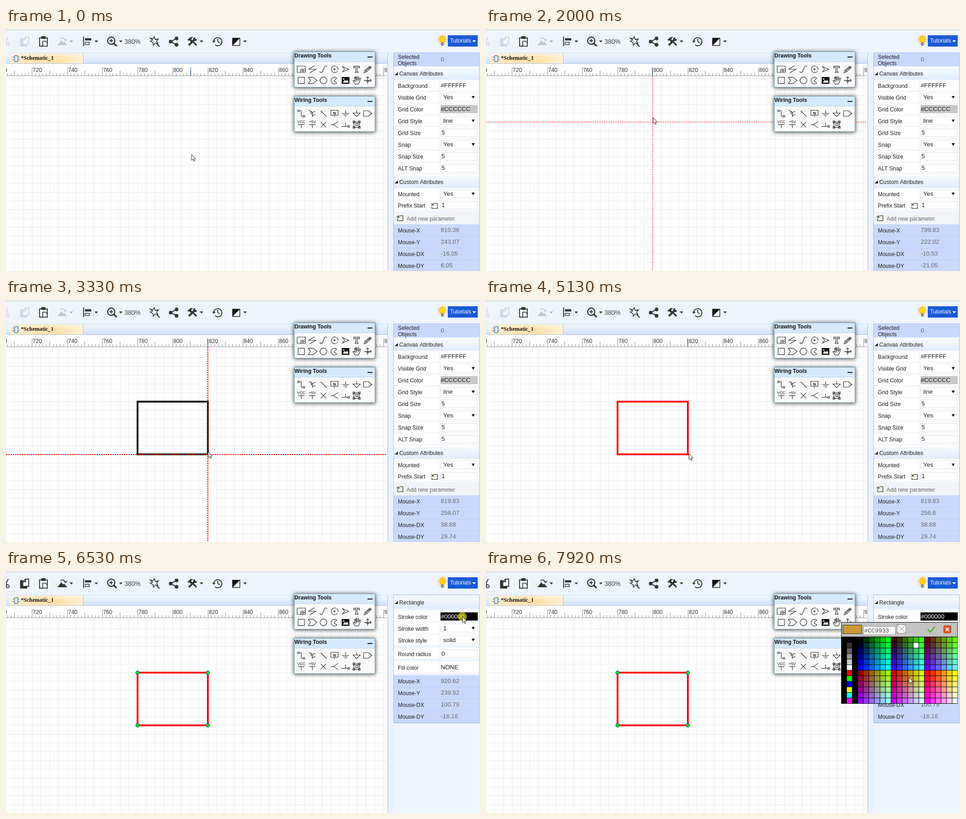
These frames come from a looping animation (1045x536 px, 8000 ms). An HTML page with a canvas:

```html
<!DOCTYPE html>
<html lang="en">
<head>
<meta charset="utf-8">
<title>Schematic editor</title>
<style>
html,body{margin:0;width:100%;height:100%;overflow:hidden;background:#f0f5ff}
canvas{display:block}
</style>
</head>
<body>
<canvas id="stage" width="1045" height="536"></canvas>
<script>
const c = document.getElementById('stage').getContext('2d');
const SANS = '"Liberation Sans",Arial,sans-serif';
const SERIF = '"Liberation Serif",Times,serif';
const MONO = '"Liberation Mono",monospace';
const LOOP = 8000, CELL = 19.375, OX = 290, OY = 226.4;
const BAR = '#eff5fe', INK = '#333', BLUE = '#c9d9fd', EDGE = '#9dbdea';

// ---- helpers ----
function path(d, stroke, fill, w = 1) {
  const p = new Path2D(d);
  if (fill) { c.fillStyle = fill; c.fill(p); }
  if (stroke) { c.strokeStyle = stroke; c.lineWidth = w; c.stroke(p); }
}
function box(x, y, w, h, fill, stroke) {
  if (fill) { c.fillStyle = fill; c.fillRect(x, y, w, h); }
  if (stroke) {
    c.strokeStyle = stroke; c.lineWidth = 1;
    c.strokeRect(x + .5, y + .5, w - 1, h - 1);
  }
}
function text(s, x, y, size = 12.24, color = '#1c1c1c', family = SANS, weight = '') {
  c.font = `${weight} ${size}px ${family}`;
  c.fillStyle = color;
  c.fillText(s, x, y);
}
function disc(x, y, r, fill, stroke, w = 1) {
  c.beginPath(); c.arc(x, y, r, 0, 7);
  if (fill) { c.fillStyle = fill; c.fill(); }
  if (stroke) { c.strokeStyle = stroke; c.lineWidth = w; c.stroke(); }
}
function fade(x, y, w, h, stops, across) {
  const g = across ? c.createLinearGradient(x, 0, x + w, 0) : c.createLinearGradient(0, y, 0, y + h);
  stops.forEach((s, i) => g.addColorStop(i / (stops.length - 1), s));
  box(x, y, w, h, g);
}
const caret = (x, y, color = INK) => path(`M${x} ${y}h8l-4 4.5z`, null, color);

// ---- motion: start, end, step count, then [progress, x, y] ----
const moves = [
  [440, 1230, 11, [0,408.6,279],[.2,430,262],[.5,540,200],[.8,628,150],[.9,645.4,133.5],[1,648.5,109.5]],
  [1540, 2230, 10, [0,648.5,109.5],[.3,560,140],[.8,320,212],[1,295.4,221.9]],
  [2610, 3330, 10, [0,295.4,221.9],[.1,318,231],[.3,399.4,279],[.6,430,312],[1,445.3,337.1]],
  [4720, 4960, 4, [0,445.3,337.1],[1,446,338.5]],
  [5130, 5200, 2, [0,446,338.5],[.5,447,341],[1,447,341]],
  [5840, 6530, 10, [0,447,341],[.2,520,335],[.5,740,300],[.7,835.9,266.8],[.85,950,170],[1,1006,103]],
  [6690, 7450, 11, [0,1006,103],[.3,1003,112],[.7,985,150],[1,958,163]],
  [7530, 7920, 6, [0,958,163],[.3,948,168],[1,932,237]]
];
const clicks = [[290,440],[1310,1540],[2460,2610],[4260,4720],[5200,5430],[6530,6690]];

function pointer(t) {
  let at = [408.6, 279];
  for (const [t0, t1, n, ...pts] of moves) {
    if (t < t0) break;
    const step = Math.floor((t - t0) / (t1 - t0) * (n - 1) + 1e-6) + 1;
    const u = Math.min(1, step / n);
    const i = Math.max(1, pts.findIndex(p => p[0] >= u - 1e-9));
    const [a, b] = [pts[i - 1], pts[i]], k = (u - a[0]) / (b[0] - a[0]);
    at = [a[1] + (b[1] - a[1]) * k, a[2] + (b[2] - a[2]) * k];
  }
  return at;
}
const onSheet = ([x, y]) => x < 840 && y > 106 && !(x > 634 && x < 815 && y < 230);
const round2 = v => +v.toFixed(2);

function readout(t, p) {
  if (t < 440) return [810.36, 243.07, -16.05, 6.05];
  let X, Y;
  if (t >= 3330 && t < 5840) [X, Y] = [819.83, t < 5130 ? 258.07 : 258.6];
  else if (!onSheet(p)) [X, Y] = t < 2300 ? [871.68, 205.44] : [920.62, 239.92];
  else {
    X = round2(810.36 + Math.round((p[0] - 408.6) / 1.0197) / 3.8);
    Y = round2(243.07 + Math.round((p[1] - 279) / 1.0197) / 3.8);
  }
  const [bx, by] = t < 2610 ? [810.36, 243.07] : t < 5430 ? [781.15, 228.33] : [819.83, 258.08];
  const dy = t >= 5130 && t < 5430 ? 29.74 : Y - by;
  return [X, Y, round2(X - bx), round2(dy)];
}

// ---- top bar ----
function toolbar(selected) {
  box(0, 0, 1045, 536, BAR);
  box(0, 0, 1045, 4, '#f1f1f1');
  box(0, 4, 1045, 1, '#c9c9c9');
  const soft = selected ? INK : '#d3d6dc';
  path('M5 20L-4 37M-6 20L2 33', soft, null, 2);
  disc(4, 36, 3.3, null, soft, 1.8);
  path('M31 24q0-2 2-2h4v15h10v4h-14q-2 0-2-2z', null, soft);
  path('M37 26l6-6h7v16h-13zM37 26h6v-6', soft, BAR, 2);
  path('M74 22h17v18h-17z', INK, BAR, 2);
  path('M78 18h9v6h-9z', null, INK);
  path('M81 29h6l4 4v7h-10z', INK, BAR, 1.6);
  const dim = selected ? INK : '#c3c6cc';
  path('M113.500 38L122 27L126 32L128 30L135 38z', null, dim);
  path('M120 23q8-3 11 4M128 25l3.500 3 2.500-4', dim, null, 1.6);
  caret(140, 27.5, selected ? INK : '#a5a8ae');
  path('M171 19v21', INK, null, 2);
  path('M174 22.5h14v5h-14z', null, INK);
  path('M174.5 31.5h9v5h-9z', INK, null, 1.4);
  caret(195, 27.5);
  disc(232, 28, 8, null, INK, 2.4);
  path('M228 28h8M232 24v8', INK, null, 2);
  path('M238 34l6 6', INK, null, 3.4);
  caret(249, 27.5);
  text('380%', 261, 35, 14, '#444');
  path('M318 22l6 2 3-5 2 6 7-1-4 5 3 5-6-1-4 5-1-6-6-3 5-2z', INK, null, 1.6);
  path('M332 34l6.500 7', INK, null, 2.4);
  path('M376 23L363 30L376 37', INK, null, 2);
  for (const [x, y] of [[376, 23], [363, 30], [376, 37]]) disc(x, y, 4, INK);
  path('M403 38L414 27', INK, null, 4);
  path('M410 28L420 38', INK, null, 3.6);
  path('M400 26l7-6h6l-5 4 3 4-3 3-4-4-2 1z', null, INK);
  path('M413 22l4-2v4l4 1-1 3-5 1-3-3z', null, INK);
  caret(427, 27.5);
  path('M458 30a9 9 0 1 1 3 7M467 24v6l4 3', INK, null, 1.9);
  path('M454.5 28h7.5l-4 5z', null, INK);
  path('M499.500 22.500h16v16h-16z', '#111', '#fff', 1.4);
  path('M499 22h17L499 39z', null, '#111');
  caret(523, 27.5);
  for (let i = 0; i < 12; i++) {
    const a = i * Math.PI / 6, x = Math.cos(a), y = Math.sin(a);
    path(`M${962 + 8 * x} ${26 + 8 * y}L${962 + 12 * x} ${26 + 12 * y}`, '#f0b73a', null, 1.4);
  }
  disc(962, 25, 7, '#fcd21c', '#e9a820');
  path('M959 31h6v8h-6z', null, '#8b8d92');
  box(974, 16, 66, 25, '#1a5ad7');
  text('Tutorials', 979, 32, 12.24, '#fff');
  caret(1028, 27, '#fff');
}

// ---- tab strip, ruler and sheet ----
function sheet(X, p) {
  fade(0, 55, 841, 23, ['#f3f8ff', '#e3eefc', '#cfe1f9']);
  box(0, 55, 841, 1, '#cfdff4');
  fade(8, 56, 162, 22, ['#fdecd2', '#ffe4b2', '#ffe1a8', '#fff0d6'], true);
  fade(8, 56, 162, 22, ['rgba(255,255,255,.45)', 'rgba(255,255,255,0)', 'rgba(255,255,255,0)']);
  box(170, 55, 1, 23, EDGE);
  box(0, 78, 841, 1, '#a9c4e8');
  path('M19 61h7v13h-7zM15 64h4M15 70h4M26 64h3M26 70h3', '#4b7fb8', '#e2eefa', 1.3);
  text('*Schematic_1', 33, 70, 12.24, '#111', SERIF, 'bold');

  box(0, 79, 841, 457, '#fefefe');
  c.save();
  c.beginPath(); c.rect(0, 79, 840, 457); c.clip();
  for (let x = OX % CELL; x < 840; x += CELL) box(Math.floor(x), 106, 1, 430, '#ececec');
  for (let y = OY - 6 * CELL; y < 536; y += CELL) if (y > 106) box(0, Math.floor(y), 840, 1, '#ececec');
  for (let v = 700; v <= 922; v += 2) {
    const x = Math.floor(OX + (v - 780) * 3.875);
    const top = v % 20 === 0 ? 87 : v % 10 === 0 ? 94 : 100;
    box(x, top, 1, 105 - top, '#8a8a8a');
    if (v % 20 === 0) text(v, x + 2, 97, 12.24, '#333');
  }
  box(0, 105, 840, 1, '#999');
  if (onSheet(p)) box(Math.round(289.4 + (X - 780) * 3.875), 87, 1, 18, '#1f6db8');
  c.restore();
  box(841, 55, 1, 481, EDGE);
  box(842, 55, 11, 481, '#e9f1fe');
}

function drawing(t, p) {
  const snap = (v, o) => o + Math.round((v - o) / CELL) * CELL;
  const sx = snap(p[0], OX), sy = snap(p[1], OY);
  if (t >= 2610) {
    const done = t >= 3330;
    const w = done ? 155 : sx - OX, h = done ? 116.25 : sy - OY;
    c.strokeStyle = t >= 5130 ? '#f00' : '#000';
    c.lineWidth = 3.875;
    c.strokeRect(OX, OY, w, h);
  }
  if (t >= 1540 && t < 4720 && onSheet(p)) {
    const bold = t >= 3330;
    c.save();
    c.setLineDash([3, 2]);
    path(`M0 ${Math.floor(sy) + (bold ? 1 : .5)}H840M${Math.floor(sx) + (bold ? 0 : .5)} 106V536`, '#f00', null, bold ? 2 : 1);
    c.restore();
  }
  if (t >= 5430) for (const x of [OX, OX + 155]) for (const y of [OY, OY + 116.25])
    disc(x, y, 4, '#00e800', '#2a35c8', 1.1);
}

// ---- floating palettes; icons sit around their own centre ----
const HAND = 'M-3 8L-8 1q0-2 2-1l3 2-2-8q1-2 2 0l2 5-1-7q1-2 2 0l1 7 2-7q2-1 2 1l-1 7 3-5q2-1 2 1l-3 8-2 4z';
const drawTools = [
  'M-9-7H9V7H-9zM-1 0H9M-1 0V7M-1 3.500H9M4 0V7', 'M5-8L-8 0H8L-6 8', 'M-8 4C-7 9-3 8-1 3L2-4C3-9 7-8 8-5',
  'M3-7A7.500 7.500 0 1 0 7 4M-3 0H3M0-3V3M4-6A7 7 0 0 1 8 1', 'M-7-6L7 0L-7 6L-2 0z',
  'M-6.500-7h13v4h-1.500l-1-2h-2.500v10l2 1v1h-7v-1l2-1v-10h-2.500l-1 2h-1.500z',
  'M-8 8l2-6L5-7l3 3L-3 6zM-6 2l3 4M2-5l3 3M-4 3L6-5',
  'M-7-7H7V7H-7z', 'M-9-7H2L10 0L2 7H-9L-4 0z', 'M-7.500 0a7.500 7.500 0 1 0 15 0a7.500 7.500 0 1 0-15 0z',
  'M5-5A7.500 7.500 0 1 0 5 6L-1 1z', 'M-8-7H8V7H-8z', HAND,
  'M-8 0H8M0-8V8M-3-5L0-8L3-5M5-3L8 0L5 3M-3 0a3 3 0 1 0 6 0'
];
const wireTools = [
  'M-4-6H0V6H4M-8-6a2 2 0 1 0 4 0a2 2 0 1 0-4 0M4 6a2 2 0 1 0 4 0a2 2 0 1 0-4 0',
  'M-8-6H-4L0-2V7M-3-5V-1L0 2M0-1L3-4H7M0 6L3 3H7', 'M-6-6L7 7', 'M-8-7H8V4H-8zM0 4V8',
  'M0-7V0M-8 0H8M-5 3H5M-2 6H2', 'M0-7V-1M-8-1H8L0 7z', 'M-9-6H2L9 0L2 6H-9z',
  'M-7 0H7M0 0V8', 'M-7 0H7M0 0V8', 'M-6-6L6 6M6-6L-6 6', 'M8-7L-2 0L8 7M-2 0H-8',
  'M-9 4H5M5 4a2 2 0 1 0 4 0a2 2 0 1 0-4 0', 'M-6-6H6V6H-6zM-8-8h4v4h-4zM4-8h4v4h-4zM-8 4h4v4h-4zM4 4h4v4h-4zM-2-3h5v5h-5z'
];
const wireLabels = { 3: ['N', 2], 7: ['VCC', -3], 8: ['+5V', -3], 11: ['1', 2] };
function palette(title, y, icons, first) {
  c.save();
  c.shadowColor = 'rgba(0,0,0,.75)'; c.shadowBlur = 9; c.shadowOffsetY = 1;
  box(635, y, 179, 79, '#fafafa');
  c.restore();
  box(635, y, 179, 22, '#d5e9fd');
  box(635, y + 22, 179, 1, '#bcd6ee');
  box(635, y, 179, 79, null, '#6f9cae');
  text(title, 636, y + 12.500, 12, '#111', SANS, 'bold');
  box(797, y + 11, 11, 2, '#111');
  icons.forEach((d, i) => {
    c.save();
    c.translate(651 + (i % 7) * 24.4, first + (i > 6 ? 24.600 : 0));
    path(d, '#2a2a2a', null, 1.15);
    if (icons === drawTools && i === 11) {
      path(d, null, '#111');
      path('M-6 5l4-6 3 3 2-4 4 7z', null, '#fff');
      disc(-4, -3, 1.5, '#fff');
    }
    if (icons === wireTools && wireLabels[i]) {
      const [s, b] = wireLabels[i];
      c.textAlign = 'center';
      text(s, 0, b, 8.500, '#111', SANS, s === 'N' ? 'bold' : '');
    }
    c.restore();
  });
}

// ---- attribute panel ----
function header(s, y) {
  fade(855, y, 188, 27, ['#f6faff', '#edf4ff', '#dfeafd']);
  path(`M864 ${y + 10}v7h-7z`, null, '#222');
  text(s, 867, y + 17.500);
}
function row(s, y, value, kind) {
  box(855, y - 18, 188, 26, '#fff');
  box(855, y + 7, 188, 1, '#dfe9f8');
  box(956, y - 18, 1, 26, '#e6edf8');
  text(s, 864, y);
  if (kind === 'select') {
    box(958, y - 15, 82, 19, '#fff', '#e6e6e6');
    text(value, 964, y - 1, 13.4);
    path(`M1026.500 ${y - 8}h7l-3.500 6z`, null, '#111');
  } else {
    if (kind) box(958, y - 14, 82, 18, kind === 'input' ? '#fff' : kind, kind === 'input' ? '#dedede' : null);
    text(value, kind === 'input' ? 960 : 958.5, y - 1, 13.4, kind === '#000' ? '#fff' : '#1c1c1c');
  }
}
function plusBox(x, y, mark) {
  path(`M${x + 6} ${y + 1}h8v11h-12v-4`, '#3f6a2c', null, 1.6);
  path(mark === 'x' ? `M${x + 1} ${y + 1}l5 5m0-5l-5 5` : `M${x} ${y + 3.500}h7m-3.500-3.500v7`, '#2b511c', null, 1.6);
}
function mouseRows(y, values) {
  box(855, y - 18, 188, 106, BLUE);
  ['Mouse-X', 'Mouse-Y', 'Mouse-DX', 'Mouse-DY'].forEach((s, i) => {
    const b = y + i * 26;
    box(855, b + 8, 188, 1, '#bccef5');
    text(s, 864, b);
    text(values[i], 958.5, b - 1, 13.4, '#666');
  });
}
function panel(selected, values) {
  box(854, 54, 190, 482, selected ? BAR : '#fff');
  if (selected) {
    header('Rectangle', 58);
    row('Stroke color', 107.5, '#000000', '#000');
    row('Stroke width', 133.5, '1', 'select');
    row('Stroke style', 159.5, 'solid', 'select');
    row('Round radius', 189.5, '0', 'input');
    row('Fill color', 219.5, 'NONE');
    mouseRows(250, values);
    box(854, 54, 190, 284, null, EDGE);
    return;
  }
  box(855, 55, 188, 30, BLUE);
  text('Selected', 864, 68);
  text('Objects', 864, 82);
  text('0', 958.5, 73.5, 13.4, '#666');
  header('Canvas Attributes', 87);
  row('Background', 132, '#FFFFFF');
  row('Visible Grid', 158, 'Yes', 'select');
  row('Grid Color', 184, '#CCCCCC', '#c8c8c8');
  row('Grid Style', 210, 'line', 'select');
  row('Grid Size', 236, '5', 'input');
  row('Snap', 262, 'Yes', 'select');
  row('Snap Size', 288, '5', 'input');
  row('ALT Snap', 314, '5', 'input');
  header('Custom Attributes', 326);
  row('Mounted', 371, 'Yes', 'select');
  row('Prefix Start', 396, '1', 'input');
  plusBox(937, 386, 'x');
  box(855, 405, 188, 28, '#f2f4f8');
  plusBox(861, 413, '+');
  text('Add new parameter', 883, 424.5, 12.24, '#666');
  mouseRows(451, values);
  box(854, 54, 190, 490, null, EDGE);
}

// ---- colour picker: web-safe cube beside a strip of basics ----
const PITCH = 12.236;
const basics = '000 333 666 999 CCC FFF F00 0F0 00F FF0 0FF F0F'.split(' ');
const wide = s => '#' + [...s].map(ch => ch + ch).join('');
function swatch(col, r) {
  if (col === 1) return wide(basics[r]);
  if (col < 3) return '#000000';
  const red = Math.floor((col - 3) / 6) + (r > 5 ? 3 : 0);
  return wide([red, (col - 3) % 6, r % 6].map(v => '0369CF'[v]).join(''));
}
function picker(t, p) {
  const hover = p[1] > 148 ? swatch(Math.floor((p[0] - 783) / PITCH), Math.floor((p[1] - 148) / PITCH)) : '#000000';
  box(783, 115, 257, 180, '#000');
  box(784, 116, 255, 31, '#c3c3c3');
  box(786, 121, 43, 20, hover, '#333');
  box(832, 124, 71, 19, '#fff', '#999');
  text(hover, 834, 138, 13, '#444', MONO);
  box(906, 120, 20, 20, '#fff', '#888');
  path('M907 121L925 139M925 121L907 139', '#777');
  path('M974 131l5 6 11-12', '#57b52c', null, 3);
  path('M1011 123h12q2 0 2 2v12q0 2-2 2h-12q-2 0-2-2v-12q0-2 2-2z', '#a9380d', '#db571f');
  path('M1013.500 127.500l7 7m0-7l-7 7', '#fff', null, 2.2);
  for (let i = 0; i < 21; i++) for (let j = 0; j < 12; j++) {
    const lit = t >= 7530 && i === 13 && j === 1;
    box(783.4 + i * PITCH, 148.2 + j * PITCH, 11.2, 11.2, lit ? '#fff' : swatch(i, j));
  }
}

function cursor(t, p, overTool) {
  if (clicks.some(([a, b]) => t >= a && t < b)) disc(p[0], p[1], 10, 'rgba(232,216,20,.68)');
  c.save();
  c.translate(p[0], p[1]);
  if (overTool) path('M-2 0q2-1 2.500 1v6q2-1 3 .500 2-.500 3 1 2 0 2.500 2v4l-2 4H0l-6-8q0-2 2-1l2 2z', '#111', '#fff', 1.1);
  else path('M.500 0V13L3.500 10.300L5.500 15L7.500 14.200L5.500 9.700H9.500z', '#222', '#fff');
  c.restore();
}

function frame(now) {
  const t = now % LOOP, p = pointer(t), values = readout(t, p), selected = t >= 5430;
  const overTool = p[0] > 639 && p[0] < 663 && p[1] > 103 && p[1] < 129;
  toolbar(selected);
  sheet(values[0], p);
  drawing(t, p);
  palette('Drawing Tools', 52, drawTools, 91);
  if (overTool) {
    box(639, 104, 23, 24, '#a5d8ee');
    path('M644 109h14v14h-14z', '#2a2a2a', null, 1.15);
  }
  palette('Wiring Tools', 150, wireTools, 188.5);
  panel(selected, values);
  if (t >= 6766) picker(t, p);
  cursor(t, p, overTool);
}

const start = performance.now();
function tick() {
  frame(performance.now() - start);
  requestAnimationFrame(tick);
}
tick();
</script>
</body>
</html>
```
